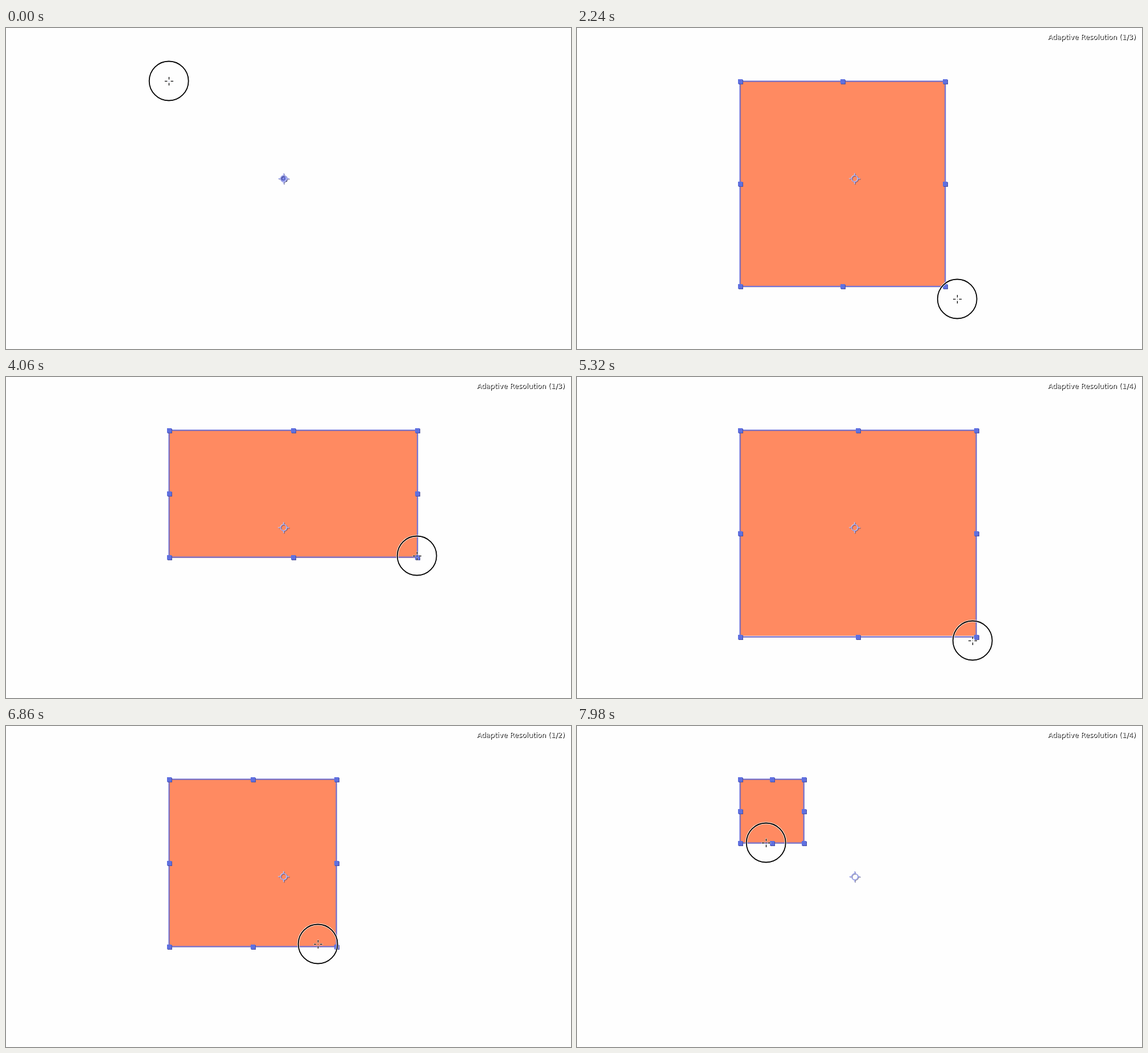
Recreate the animation shown at these times as an HTML page with a canvas. Size 993x564 px, loop 8000 ms.

```html
<!DOCTYPE html>
<html lang="en">
<head>
<meta charset="utf-8">
<title>Drawing a rectangle</title>
<style>
  html, body { margin: 0; width: 100%; height: 100%; overflow: hidden; background: #fefefe; }
  canvas { display: block; width: 993px; height: 564px; }
</style>
</head>
<body>
<canvas id="stage" width="993" height="564"></canvas>
<script>
const ctx = document.getElementById('stage').getContext('2d');
const LOOP = 8000, STEP = 70;
const ORIGIN = { x: 286.5, y: 93.5 };
const BLUE = '#5f70e0', LINE = '#7472d4', ORANGE = '#ff8a61';

// Pointer path: time, x, y
const PATH = [
  [840, 286.5, 93.5], [1190, 385, 190], [1680, 558, 368], [2170, 646.5, 454],
  [2240, 668.5, 476], [2520, 690, 494], [2870, 697, 501.5], [3360, 709, 450],
  [3430, 711.5, 424], [3500, 713.5, 404], [3990, 723, 316.5], [4060, 722.5, 314.5],
  [4200, 722, 313], [5040, 708, 405], [5250, 701.5, 456.5], [5320, 695, 463.5],
  [5880, 668, 502], [6720, 572, 400], [6790, 560, 387.5], [6860, 548.5, 383.5],
  [7560, 400, 236], [7910, 336, 205.5], [7980, 332.5, 205]
];

const slope = (i, k) => (PATH[i + 1][k] - PATH[i][k]) / (PATH[i + 1][0] - PATH[i][0]);

// Harmonic-mean tangents keep the curve from overshooting
function tangent(i, k) {
  if (i === 0 || i === PATH.length - 1) return 0;
  const a = slope(i - 1, k), b = slope(i, k);
  return a * b <= 0 ? 0 : 2 * a * b / (a + b);
}

function along(t, k) {
  const last = PATH.length - 1;
  if (t <= PATH[0][0]) return PATH[0][k];
  if (t >= PATH[last][0]) return PATH[last][k];
  let i = 0;
  while (t >= PATH[i + 1][0]) i++;
  const [p, q] = [PATH[i], PATH[i + 1]];
  const d = q[0] - p[0], u = (t - p[0]) / d, v = 1 - u;
  return v * v * (1 + 2 * u) * p[k] + u * u * (3 - 2 * u) * q[k]
    + d * u * v * (v * tangent(i, k) - u * tangent(i + 1, k));
}

const pointer = t => ({ x: along(t, 1), y: along(t, 2) });
const isSquare = t => t < 2940 || t >= 5950;

// The shape trails the pointer by one step
function corner(t) {
  const p = pointer(t - STEP);
  if (!isSquare(t)) return p;
  const side = Math.max(p.x - ORIGIN.x, p.y - ORIGIN.y);
  return { x: ORIGIN.x + side, y: ORIGIN.y + side };
}

function resolution(t) {
  if (t < 4690) return 3;
  if (t < 6090) return 4;
  return t < 7560 ? 2 : 4;
}

function segment(x1, y1, x2, y2) {
  ctx.beginPath();
  ctx.moveTo(x1, y1);
  ctx.lineTo(x2, y2);
  ctx.stroke();
}

function ring(x, y, r, color, width) {
  ctx.strokeStyle = color;
  ctx.lineWidth = width;
  ctx.beginPath();
  ctx.arc(x, y, r, 0, Math.PI * 2);
  ctx.stroke();
}

function handle(x, y) {
  ctx.fillStyle = '#4a4f9c';
  ctx.fillRect(x - 3, y - 3, 8, 8);
  ctx.fillStyle = BLUE;
  ctx.fillRect(x - 4, y - 4, 8, 8);
}

function drawShape(t) {
  const { x, y } = ORIGIN, c = corner(t);
  const w = c.x - x, h = c.y - y;
  if (w < 1 || h < 1) return;
  const lag = isSquare(t) ? 0 : 0.15 * (c.y - corner(t - STEP).y);
  ctx.fillStyle = ORANGE;
  ctx.fillRect(x, y, w + 0.5, h + 0.5 - lag);
  ctx.lineWidth = 1;
  ctx.strokeStyle = 'rgba(90,70,110,0.45)';
  ctx.strokeRect(x + 1, y + 1, w, h);
  ctx.lineWidth = 2;
  ctx.strokeStyle = LINE;
  ctx.strokeRect(x, y, w, h);
  for (let i = 0; i < 3; i++)
    for (let j = 0; j < 3; j++)
      if (i !== 1 || j !== 1)
        handle(Math.round(x + w * i / 2), Math.round(y + h * j / 2));
}

function anchorMark(x, y, color) {
  ring(x, y, 5.5, color, 1.5);
  for (const [dx, dy] of [[1, 0], [-1, 0], [0, 1], [0, -1]])
    segment(x + dx * 5, y + dy * 5, x + dx * 9.5, y + dy * 9.5);
}

function drawAnchor(t) {
  if (t < STEP) {
    ctx.fillStyle = '#33335c';
    ctx.fillRect(487, 264, 7, 6);
    ctx.fillStyle = '#8790ea';
    ctx.beginPath();
    ctx.arc(488, 264.5, 6, 0, Math.PI * 2);
    ctx.fill();
    ring(487.5, 264.5, 2.5, '#4c56b8', 1.2);
  }
  anchorMark(489.2, 265.7, 'rgba(50,45,70,0.5)');
  anchorMark(487.6, 264.4, 'rgba(255,255,255,0.6)');
  anchorMark(488.2, 264.8, '#9aa2ee');
}

function crosshair(x, y, color, width, grow) {
  ctx.strokeStyle = color;
  ctx.lineWidth = width;
  for (const s of [-1, 1]) {
    segment(x + s * (3 - grow), y, x + s * (7.5 + grow), y);
    segment(x, y + s * (3 - grow), x, y + s * (7.5 + grow));
  }
}

function drawPointer(t) {
  const p = pointer(t), x = Math.floor(p.x) + 0.5, y = Math.floor(p.y) + 0.5;
  ring(x - 0.3, y - 0.5, 34.5, 'rgba(255,255,255,0.75)', 4);
  ring(x - 0.3, y - 0.5, 34.5, '#000', 1.8);
  crosshair(x, y, 'rgba(255,255,255,0.75)', 2.6, 0.7);
  crosshair(x, y, '#000', 1.3, 0);
  ctx.fillStyle = t < 350 ? BLUE : '#222';
  ctx.fillRect(x - 0.5, y - 0.5, 1, 1);
}

function drawLabel(t) {
  const label = `Adaptive Resolution (1/${resolution(t)})`;
  ctx.font = '12.2px "DejaVu Sans", sans-serif';
  ctx.textAlign = 'right';
  ctx.fillStyle = '#000';
  ctx.fillText(label, 983, 20.7);
  ctx.fillStyle = '#fff';
  ctx.fillText(label, 982, 19.7);
}

function draw(t) {
  ctx.fillStyle = '#fefefe';
  ctx.fillRect(0, 0, 993, 564);
  drawShape(t);
  drawAnchor(t);
  drawPointer(t);
  if (t >= 980) drawLabel(t);
}

const start = performance.now();
function tick() {
  const t = (performance.now() - start) % LOOP;
  draw(Math.floor(t / STEP) * STEP);
  requestAnimationFrame(tick);
}
tick();
</script>
</body>
</html>
```
